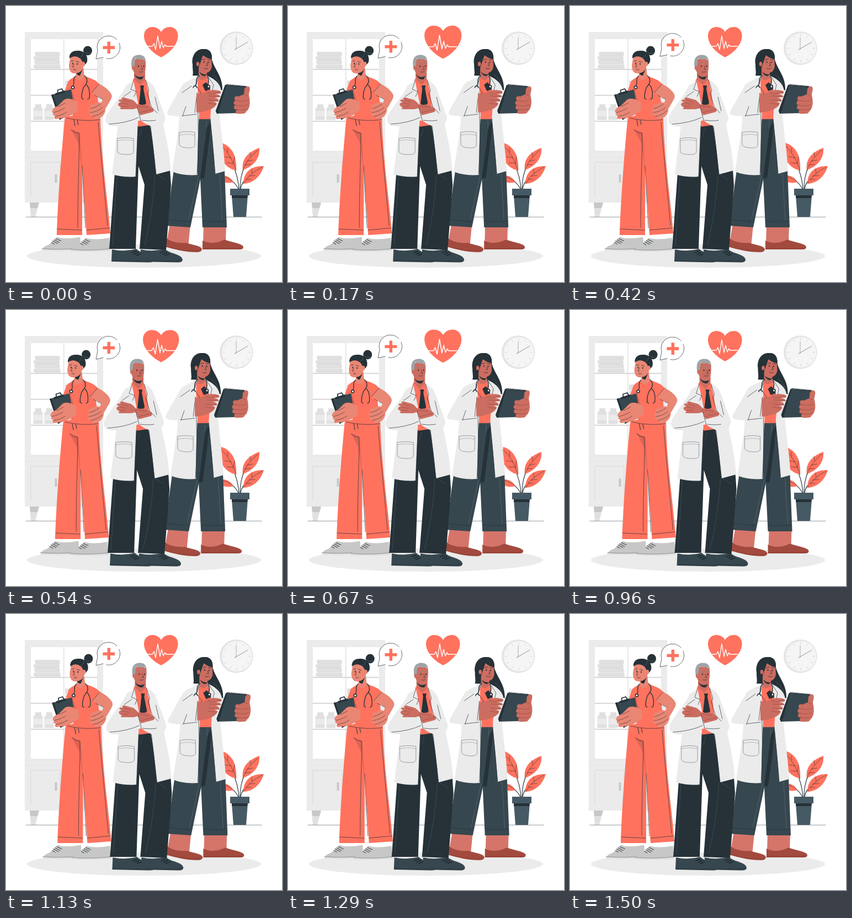
Write an HTML page with a canvas that moves like this. It is 500x500 px and loops after 1540 ms.

```html
<!DOCTYPE html>
<html lang="en">
<head>
<meta charset="utf-8">
<title>Medical team</title>
<style>
  html, body { margin: 0; width: 100%; height: 100%; overflow: hidden; background: #fff; }
  canvas { display: block; width: 100vw; height: 100vh; }
</style>
</head>
<body>
<canvas id="stage"></canvas>
<script>
const LOOP = 1540;
const CORAL = '#ff725e', DARK = '#263238', SLATE = '#37474f', STEEL = '#455a64';
const COAT = '#ebebeb', PALE = '#e0e0e0', GREY = '#c7c7c7', WHITE = '#fff';
const FAIR = '#e98674', TAN = '#cc6d61', TAN_SHADE = '#8f453c', CORAL_SHADE = '#de6454', SHOE = '#a34a3e';

const canvas = document.getElementById('stage');
const ctx = canvas.getContext('2d');

const fill = (color, d) => ({ path: new Path2D(d), color });
const line = (d, color = DARK, width = 0.8) => ({ path: new Path2D(d), color, width });
const box = (color, x, y, w, h) => fill(color, `M${x} ${y}h${w}v${h}h${-w}z`);
const dot = (color, x, y, rx, ry = rx) =>
  fill(color, `M${x - rx} ${y}a${rx} ${ry} 0 1 0 ${2 * rx} 0a${rx} ${ry} 0 1 0 ${-2 * rx} 0`);

function paint(shapes) {
  for (const { path, color, width } of shapes) {
    if (width) {
      ctx.strokeStyle = color;
      ctx.lineWidth = width;
      ctx.stroke(path);
    } else {
      ctx.fillStyle = color;
      ctx.fill(path);
    }
  }
}

const bottle = x => [
  box(PALE, x + 3, 178, 11, 4),
  fill(PALE, `M${x + 4} 182h9l3 4v20h-16v-20z`),
  box(COAT, x, 190, 16, 10),
  line(`M${x + 4} 182h9l3 4v20h-16v-20z`, '#d8d8d8', 0.6)
];

const towel = (x, y, w) => [
  fill(PALE, `M${x + 3} ${y}h${w - 6}q3 0 3 3.5t-3 3.5h${6 - w}q-3 0 -3 -3.5t3 -3.5`),
  line(`M${x + 3} ${y + 7}h${w - 4}`, GREY, 0.6)
];

const cabinet = [
  box(COAT, 34, 47, 142, 309),
  box(WHITE, 45, 60, 58.5, 202),
  box(WHITE, 106, 60, 59, 202),
  ...[115, 162, 209].flatMap(y => [box(COAT, 45, y - 1.5, 120, 2.5), line(`M45 ${y}H165`, GREY, 0.9)]),
  ...towel(52, 83, 46), ...towel(50, 90.5, 47), ...towel(51, 98, 47), ...towel(50, 106, 49),
  ...bottle(50), ...bottle(70),
  box(PALE, 107, 135, 13, 9),
  box(COAT, 107, 144, 11, 17),
  line('M34 274H176', PALE, 0.6),
  line('M45 344V283H98V344', '#cfcfcf', 0.7),
  line('M109 283H165V344H109Z', '#cfcfcf', 0.7),
  box(GREY, 88.5, 305, 4, 15),
  fill(PALE, 'M43 356H60L53 382H45Z'),
  fill(GREY, 'M43 356H60L57 366H44Z')
];

const ticks = Array.from({ length: 12 }, (_, i) => {
  const a = i * Math.PI / 6, c = Math.cos(a), s = Math.sin(a);
  return line(`M${418 + 22 * c} ${76.5 + 22 * s}L${418 + 25 * c} ${76.5 + 25 * s}`, GREY);
});

const clock = [
  dot('#e4e4e4', 417.3, 76.5, 30.3),
  dot('#f5f5f5', 418.5, 76.5, 27.5),
  ...ticks,
  line('M417 79L417 57', '#a5a5a5', 0.9),
  line('M414 79L437 66', '#929292', 1)
];

const plant = [
  line('M422 331C420 309 416 296 398 262M424 331C424 307 432 281 455 262M425 331C427 318 439 304 462 293M421 331C415 320 407 313 394 311', DARK, 1.1),
  fill(CORAL, 'M390 248C405 252 419 267 417 298C402 295 390 284 387 265Z'),
  fill(CORAL, 'M459 257C440 264 426 276 429 297C445 292 461 278 459 257Z'),
  fill(CORAL, 'M467 290C445 289 430 300 430 322C447 321 461 310 467 290Z'),
  fill(CORAL, 'M390 307C401 306 408 312 412 319C402 322 394 320 390 316Z'),
  line('M391 254Q408 270 417 298M402 265L401 257M408 275L396 273M413 285L400 284M412 284L414 273M456 261Q437 277 429 297M443 273L442 265M437 281L447 279M433 288L443 287M464 292Q442 302 430 322M446 303L445 295M440 308L451 307M435 314L444 314M392 309Q404 311 412 319', DARK, 0.6),
  fill(STEEL, 'M409 343H438L435 382H412Z'),
  fill(DARK, 'M409 342H438L437 348H409Z'),
  box(STEEL, 406, 331, 35, 12)
];

const background = [
  ...cabinet,
  line('M36 382.3H463', DARK, 0.5),
  dot(COAT, 250, 453, 212, 21),
  ...clock,
  ...plant
];

const eyes = (x1, y1, x2, y2) => [dot(DARK, x1, y1, 1, 1.5), dot(DARK, x2, y2, 1, 1.5)];

const womanWithPad = [
  // hair behind the coat
  fill(DARK, 'M337.5 103C337 88 345 78 357 78C368 77 374 85 373 97C378 116 393 127 392 153C382 148 368 139 361 127L338 126Q341 114 337.5 103Z'),
  // ankles and shoes
  fill('#d5756a', 'M297 394L291 428L330 437L334 396Z'),
  fill('#d5756a', 'M358 396L357 431L398 429L399 396Z'),
  fill(SHOE, 'M291 421C300 428 315 430 327 429C337 433 354 434 355 441Q354 446 346 446C325 446 306 441 288 436Z'),
  fill(SHOE, 'M356 425C368 431 383 430 396 423C406 428 430 430 430 437Q430 441 423 441H356Z'),
  line('M291 436Q324 445 353 443M357 439H428', '#7e382f', 0.6),
  // trousers
  fill(SLATE, 'M304 297L290 398L334 401L352 314L356 401H400L396 297L375 201H348L341 303Z'),
  fill(DARK, 'M364 219L372 207L367 250L359 312L352 312Z'),
  line('M292 387L335 391M357 390H399', DARK, 0.7),
  line('M349 308L331 386M387 304L392 388M363 222V207', '#6b7a82', 0.5),
  // shirt and neck
  fill(CORAL, 'M347 131L368 128L377 160L372 205H348Z'),
  fill(TAN, 'M349 112V130Q355 139 365 129L363 117Z'),
  fill(DARK, 'M350 119Q358 126 365 123L360 127Q354 127 350 119Z'),
  // coat
  fill(COAT, 'M348 126C341 132 327 135 320 142C312 156 299 179 293 190C290 196 293 198 302 199L314 200C313 232 305 269 301 300Q320 308 347 306C347 273 348 219 350 197L346 158Z'),
  fill(COAT, 'M364 126C375 131 385 137 389 149L391 181L387 196C390 235 395 260 397 299L379 304C377 269 373 230 370 205L373 162Z'),
  line('M346 158Q351 239 346 305M370 204L379 303M320 199L326 182M319 199L345 196M346 158L342 193M349 128L344 144L354 158L347 161M367 129L376 143L372 160M319 157L336 145', DARK, 0.7),
  line('M314 229Q328 226 342 229V253Q340 258 328 257Q315 256 314 251Z', '#717b80', 0.7),
  line('M314 234Q328 231 342 234', '#8d9497', 0.6),
  // stethoscope
  line('M350 126C341 132 348 141 342 145M365 127C369 136 366 142 363 148', DARK, 1.5),
  line('M339 148Q342 141 346 148', DARK, 1.4),
  // face
  fill(TAN, 'M349 91C354 87 362 91 372 94L373 109C372 117 367 122 360 121C353 119 350 114 348 108Z'),
  fill(DARK, 'M338 110C338 90 346 78 358 78C369 77 374 85 373 97C366 95 360 92 357 89C354 96 353 102 349 111L346 124H339Z'),
  dot(TAN, 347.5, 105, 2.8, 4),
  ...eyes(358.5, 101.5, 366.5, 102),
  line('M355.5 97.5L361 96M365 97L370 98M364 103L365.5 108L362.5 108M359 113Q363 115 366 113', DARK, 0.8),
  line('M374 124Q386 134 388 145', '#5a676e', 0.6),
  // near arm
  fill(TAN, 'M345 160C355 159 360 157 366 154C373 151 386 152 389 155Q391 157 387 159L379 159Q389 161 388 165L378 166Q387 168 385 173L376 173Q384 175 381 179C377 186 363 192 345 193Z'),
  fill(DARK, 'M356 143L362 138L369 146L370 151L361 154Z'),
  dot(DARK, 367, 146, 3.2),
  dot(WHITE, 367, 146, 1.4),
  line('M364 155C368 161 374 160 388 155M367 163L388 164M366 170L384 172M365 176L379 178', TAN_SHADE, 0.6),
  // notepad
  fill(SLATE, 'M397 143L436 146L420 194L382 195L380 190Z'),
  fill(DARK, 'M397 143L399 144L384 195H382L380 190Z'),
  line('M399 142.5L436 146', DARK, 1),
  ...Array.from({ length: 11 }, (_, i) => line(`M${400 + i * 3.2} ${144.6 + i * 0.28}q-1 -2.5 1 -3`, DARK, 0.9)),
  fill(TAN, 'M432 150Q437 143 441 147C443 151 440 157 440 161Q444 177 439 187C434 194 428 196 422 195L423 163L431 160Z'),
  line('M418 167.5L434 169M416.5 175.5L434 177M417 183.5L433 185', TAN, 8),
  line('M420 191.5L431 191', TAN, 7.5),
  line('M417 171.5Q428 174 438 171M416 179.5Q426 183 438 179M417 187.5Q427 190 436 187M431 160L437 163', TAN_SHADE, 0.6)
];

const sneaker = (x, y) => [
  fill(GREY, `M${x + 27} ${y}Q${x + 40} ${y + 5} ${x + 69} ${y}L${x + 70} ${y + 23}Q${x + 31} ${y + 26} ${x} ${y + 24}Q${x} ${y + 18} ${x + 12} ${y + 14}Z`),
  fill(PALE, `M${x} ${y + 21}Q${x + 32} ${y + 24} ${x + 70} ${y + 20}V${y + 24}Q${x + 32} ${y + 26} ${x} ${y + 24}Z`),
  line(`M${x} ${y + 21}Q${x + 32} ${y + 24} ${x + 70} ${y + 20}`, '#6f7578', 0.7),
  line(`M${x + 19} ${y + 7}l9 5M${x + 22} ${y + 5}l9 5M${x + 25} ${y + 3}l9 4M${x + 17} ${y + 10}l5 3`, DARK, 1)
];

const nurse = [
  ...sneaker(65.5, 418.5),
  ...sneaker(118, 420),
  // trousers
  fill(CORAL, 'M107 199C104 229 95 328 92 415H138L138 290L146 415L189 412C186 362 173 284 171 204Z'),
  fill(CORAL_SHADE, 'M118 223L134 230L138 302L132 250Z'),
  line('M118 224Q126 231 132 230C134 255 130 314 130 401M138 290L144 402M167 210C171 263 179 341 184 398', DARK, 0.7),
  line('M93 404L137 406M146 406L188 402', DARK, 0.7),
  line('M122 201L125 217M128 201L131 215', DARK, 1),
  // far arm
  fill(FAIR, 'M110 144L103 164L119 172L125 148Z'),
  // top
  fill(CORAL, 'M127 126C121 131 114 133 112 138L107 153L119 157L121 198L109 203Q137 210 171 206L165 157L169 142C164 134 155 132 146 128Z'),
  fill(CORAL_SHADE, 'M118 148L121 170L123 198L129 182Z'),
  line('M110 203Q140 210 170 206', DARK, 0.7),
  // neck and head
  fill(FAIR, 'M128 114L126 128Q132 141 142 128L140 110Z'),
  fill(DARK, 'M127 121Q134 122 139 114L134 126Q129 126 127 121Z'),
  fill(FAIR, 'M117 90L114 107Q114 121 123 122C133 123 139 116 142 105L139 91Z'),
  fill(DARK, 'M115 95C114 86 120 80 131 81C143 81 149 91 147 101Q144 107 139 108C140 101 136 96 133 94Q124 88 115 95Z'),
  dot(DARK, 148, 81, 8, 8.5),
  line('M140 81Q145 88 153 85M140 86Q138 92 134 94', '#5a676e', 0.7),
  dot(FAIR, 140, 105, 3.2, 4),
  ...eyes(121, 104, 129, 105),
  line('M118 100L122 99M127 100L132 102M123 105L120.5 110L123 111M122 115Q125 117 127 115', DARK, 0.8),
  // stethoscope
  line('M126 127C119 132 126 141 121 145M142 126C148 131 148 138 144 143C138 149 137 158 137 167L140 169M145 142C151 147 152 158 151 167L148 169', DARK, 1.3),
  dot(DARK, 121, 147.5, 3.3),
  dot(COAT, 121, 147.5, 1.7),
  // near arm
  fill(FAIR, 'M155 157L169 141Q186 150 191 160Q193 165 189 171L181 185L172 178L175 169Z'),
  line('M155 157L169 141M161 162L175 169', DARK, 0.6),
  fill(FAIR, 'M180 181C182 194 175 204 162 205Q156 204 160 200L152 198Q149 195 153 193L150 191Q149 187 154 186L152 183Q151 179 160 177C168 172 176 175 180 181Z'),
  line('M154 186Q164 183 171 178M153 193Q165 192 175 184M157 200Q169 198 177 190', DARK, 0.6),
  // clipboard
  fill(SLATE, 'M82 161L118 151L125 193L97 206Z'),
  fill(DARK, 'M82 161L85 160L100 205L97 206Z'),
  line('M91 159.5L106 155', DARK, 3.5),
  line('M94 157L93.5 152.5L101 150L103.5 154', DARK, 1.8),
  fill(FAIR, 'M84 189Q85 184 94 181L105 170Q114 164 130 174L131 187C125 198 106 203 90 205Q85 203 89 199Q82 197 86 194Q82 192 84 189Z'),
  line('M86 193Q98 190 106 185M89 200Q103 198 110 192M95 182L107 176', DARK, 0.6)
];

const oxford = x => [
  fill(SLATE, `M${x + 1} 441Q${x + 23} 446 ${x + 45} 440C${x + 53} 449 ${x + 76} 449 ${x + 77} 460Q${x + 76} 465 ${x + 67} 464.5L${x} 463Z`),
  line(`M${x + 37} 447l8 -3M${x + 41} 450l8 -4M${x + 45} 452l8 -3`, '#11191d', 1.1),
  line(`M${x + 1} 461Q${x + 40} 463 ${x + 76} 461`, DARK, 0.8)
];

const doctor = [
  ...oxford(243),
  ...oxford(191),
  // trousers
  fill(DARK, 'M237 215L197 302L187 440H235L240 290L251 324L242 440L290 442L299 325L297 296L263 216Z'),
  line('M201 309L193 435M263 223L275 306L289 315M270 306Q266 375 251 434M242 236L246 222', STEEL, 0.6),
  // shirt, tie and neck
  fill(CORAL, 'M232 132L252 132L258 155L266 215L237 219Z'),
  fill(TAN, 'M232 115V133L243 143L252 133V118Z'),
  fill(DARK, 'M232 123Q239 132 250 127L246 133Q237 134 232 123Z'),
  fill(CORAL, 'M231 131L241 143L236 154L229 137ZM252 132L246 144L253 153L255 140Z'),
  fill(DARK, 'M243 144H250L249 150L254 176L248 183L241 177L244 150Z'),
  // coat body
  fill(COAT, 'M231 135C225 141 219 141 216 146L205 175L203 215L192 305Q215 311 235 309L239 215L239 175Z'),
  fill(COAT, 'M253 133C261 138 268 143 270 150L288 200L285 216C291 243 297 270 298.5 298L272 305C269 274 266 243 261 217L263 184L258 154Z'),
  line('M239 217L235 309M262 218L272 305M231 136L226 151L236 155L232 164M253 134L259 153L256 159L264 185', DARK, 0.7),
  line('M202 240Q217 237 231 240V265Q229 270 217 269Q203 269 202 264Z', '#717b80', 0.7),
  line('M202 244Q217 241 231 244', '#8d9497', 0.6),
  // crossed arms
  fill(COAT, 'M214 150C210 162 184 189 181 202C178 212 185 219 201 218L244 207L238 183L215 188L220 165Z'),
  fill(COAT, 'M270 150L288 199C291 207 285 215 275 219Q257 219 244 207L240 195L267 190L272 185Z'),
  fill(TAN, 'M239 187L233 182Q230 178 237 178L246 179Q255 177 265 184Q270 187 266 192L243 198Z'),
  fill(TAN, 'M203 178Q203 175 209 175L204 172Q204 168 212 170L209 167Q211 164 218 167L229 170Q236 174 241 184L230 187L209 187Q204 186 209 183Q203 182 203 178Z'),
  line('M206 175L221 178M210 169L224 174M207 182L220 182M236 181Q251 182 257 184M243 193L267 187', TAN_SHADE, 0.6),
  line('M238 184L244 207M187 214Q219 212 240 202M246 207Q261 209 271 207M213 164L226 155M270 165L276 190M268 188L274 194', DARK, 0.7),
  // head
  fill(TAN, 'M228 100Q228 117 234 123Q241 128 249 125Q254 120 253 99Q241 90 228 100Z'),
  fill('#9fa4a6', 'M229 116C225 101 227 89 240 88.5C249 88 254 93 253 103L250 96Q241 98 234 95L232 114Z'),
  dot(TAN, 230.5, 112, 2.6, 3.6),
  ...eyes(240, 109, 249.5, 109),
  line('M237 105L243 104M247 104L251 105', '#85898b', 1.2),
  line('M245 109L248 115L244.5 115M241 119.5Q245 120.5 248 119', DARK, 0.7)
];

const bubble = [
  fill(WHITE, 'M166 81A20.6 20.6 0 1 1 176 93L163 96Z'),
  line('M182 95A20.6 20.6 0 0 0 205 67M201 61A20.6 20.6 0 0 0 166 81L163 96L176 93', DARK, 0.7),
  fill(CORAL, 'M183.6 64.5h5.4v8h8.2v5.4h-8.2v8.2h-5.4v-8.2h-8.2v-5.4h8.2z')
];

const heart = [
  fill(CORAL, 'M281 93C262 83 250 68 250 54C250 44 257 38 265 38C273 38 278 42 281 47C284 42 289 38 297 38C305 38 311.5 44 311.5 54C311.5 68 300 83 281 93Z'),
  line('M254 73H265L268 68L271 79L275 54L279 77L282 64L285 76L288 70L290 73H304', WHITE, 1.4)
];

// Key poses, [time, value], joined by straight moves.
function pose(keys, t) {
  const i = keys.findIndex(([time]) => time > t);
  if (i < 1) return keys[i < 0 ? keys.length - 1 : 0][1];
  const [[t0, v0], [t1, v1]] = [keys[i - 1], keys[i]];
  return v0 + (v1 - v0) * (t - t0) / (t1 - t0);
}

const SWAY = [[0, 0], [170, -0.8], [420, -2], [670, -3.8], [710, -4], [790, 3.9], [830, 3.6], [1080, 1.6], [1330, 0.6], [1500, 0]];
const FLOAT = [[0, 0], [170, -1.5], [420, -4.6], [670, -9], [720, -9.2], [830, -6.9], [1130, -3], [1330, -1.1], [1500, 0]];

const beat = t => t < 840 ? 1 + 0.1 * Math.sin(Math.PI * t / 420) ** 2 : 1;

function shifted(x, y, shapes) {
  ctx.save();
  ctx.translate(x, y);
  paint(shapes);
  ctx.restore();
}

function draw(t) {
  const ratio = devicePixelRatio || 1;
  const w = Math.round(innerWidth * ratio), h = Math.round(innerHeight * ratio);
  if (canvas.width !== w || canvas.height !== h) {
    canvas.width = w;
    canvas.height = h;
  }
  ctx.setTransform(w / 500, 0, 0, h / 500, 0, 0);
  ctx.lineCap = ctx.lineJoin = 'round';
  ctx.fillStyle = WHITE;
  ctx.fillRect(0, 0, 500, 500);
  paint(background);
  shifted(0, pose(FLOAT, t), bubble);

  const scale = beat(t);
  ctx.save();
  ctx.translate(280.7, 65.5);
  ctx.scale(scale, scale);
  ctx.translate(-280.7, -65.5);
  paint(heart);
  ctx.restore();

  const sway = pose(SWAY, t);
  for (const person of [womanWithPad, nurse, doctor]) shifted(sway, 0, person);
}

const start = performance.now();
function tick() {
  draw((performance.now() - start) % LOOP);
  requestAnimationFrame(tick);
}
tick();
</script>
</body>
</html>
```
